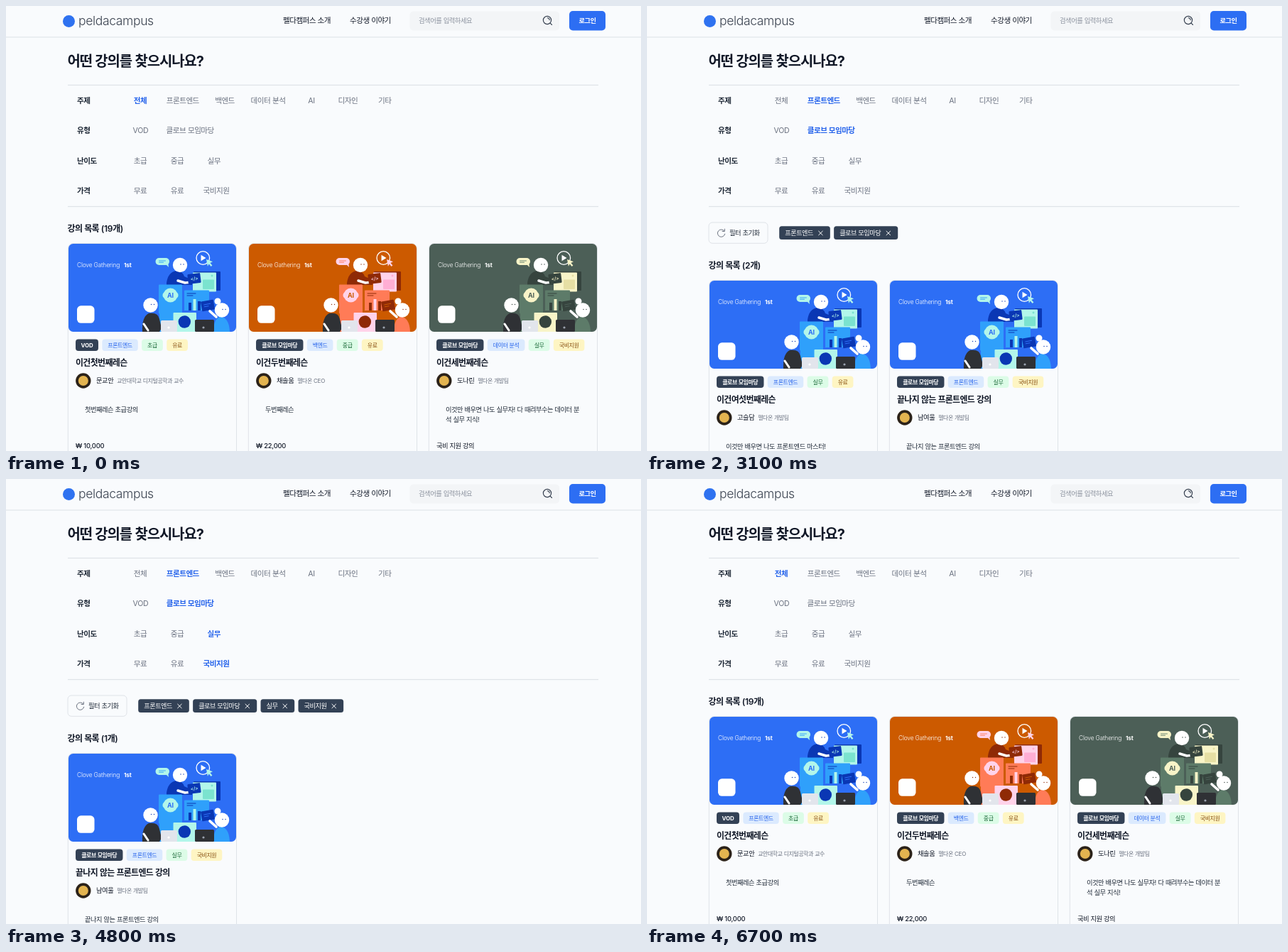
An HTML page for the animation above (8200 ms loop, 894 px wide and 627 px high).

```html
<!DOCTYPE html>
<html lang="ko">
<head>
<meta charset="utf-8">
<title>강의 목록</title>
<style>
html, body { margin: 0; width: 100%; height: 100%; overflow: hidden; background: #f9fbfd; }
svg { display: block; width: 894px; height: 627px; }
text { font-family: Inter, "Noto Sans CJK KR", sans-serif; letter-spacing: -.02em; white-space: pre; }
.ko { letter-spacing: -.052em; }
</style>
</head>
<body>
<svg id="stage" viewBox="0 0 894 627">
  <defs>
    <linearGradient id="shade" x1="0" y1="0" x2=".95" y2=".2">
      <stop offset="0" stop-color="#e5e7eb"/><stop offset="1" stop-color="#f4f5f6"/>
    </linearGradient>
    <clipPath id="cover"><rect width="236" height="124" rx="6.5"/></clipPath>
  </defs>
  <g id="page"></g>
</svg>
<script>
const LOOP = 8200;
const BLUE = '#2563eb', INK = '#111827', GRAY = '#6b7280', LINE = '#dfe3e8', SLATE = '#334155', BONE = '#d1d5db';
const CLUB = '클로브 모임마당';

// Hangul runs are set tighter than Latin
const runs = s => s.replace(/&/g, '&amp;').replace(/</g, '&lt;').replace(/[가-힣]+/g, '<tspan class="ko">$&</tspan>');
const text = (x, mid, s, size, fill = INK, weight = 400, anchor = 'start') =>
  `<text x="${x}" y="${mid + size * .37}" font-size="${size}" fill="${fill}" font-weight="${weight}" text-anchor="${anchor}">${runs(s)}</text>`;
const rect = (x, y, w, h, r, fill, extra = '') =>
  `<rect x="${x}" y="${y}" width="${w}" height="${h}" rx="${r}" fill="${fill}" ${extra}/>`;
const circle = (x, y, r, fill, extra = '') => `<circle cx="${x}" cy="${y}" r="${r}" fill="${fill}" ${extra}/>`;
const path = (d, fill, extra = '') => `<path d="${d}" fill="${fill}" ${extra}/>`;
const stroke = (d, color, w) => path(d, 'none', `stroke="${color}" stroke-width="${w}" stroke-linecap="round" stroke-linejoin="round"`);
const at = (x, y, body, turn = 0) => `<g transform="translate(${x} ${y}) rotate(${turn})">${body}</g>`;

// approximate advance, used for pill sizes
const textWidth = (s, size) =>
  size * [...s].reduce((sum, c) => sum + (c === ' ' ? .27 : c > '\u3000' ? .868 : .67), 0);

const themes = {
  blue: { bg: '#2d6ef5', dark: '#0a37b4', mid: '#2fa0fb', light: '#b2f6ea', tint: '#7be3cf' },
  orange: { bg: '#cc5a00', dark: '#8f2a06', mid: '#ff7b57', light: '#ffd3ea', tint: '#ffaed4' },
  green: { bg: '#4c5f57', dark: '#36443e', mid: '#5d7b69', light: '#f8f4c8', tint: '#e6dfa4' }
};

const course = (tags, title, who, team, lines, price, theme = 'blue') =>
  ({ tags, title, who, team, lines, price, theme });
const first = course(['VOD', '프론트엔드', '초급', '유료'], '이건첫번째레슨', '문교안',
  '교안대학교 디지털공학과 교수', ['첫번째레슨 초급강의'], '₩ 10,000');
const second = course([CLUB, '백엔드', '중급', '유료'], '이건두번째레슨', '채솔움',
  '펠다온 CEO', ['두번째레슨'], '₩ 22,000', 'orange');
const third = course([CLUB, '데이터 분석', '실무', '국비지원'], '이건세번째레슨', '도나린',
  '펠다온 개발팀', ['이것만 배우면 나도 실무자! 다 때려부수는 데이터 분', '석 실무 지식!'], '국비 지원 강의', 'green');
const sixth = course([CLUB, '프론트엔드', '실무', '유료'], '이건여섯번째레슨', '고슬담',
  '펠다온 개발팀', ['이것만 배우면 나도 프론트엔드 마스터!'], '₩ 22,000');
const basics = course(['VOD', '프론트엔드', '실무', '무료'], '프론트엔드 필수 강의', '고슬',
  '펠다온', ['프론트엔드 필수 강의'], '무료');
const endless = course([CLUB, '프론트엔드', '실무', '국비지원'], '끝나지 않는 프론트엔드 강의', '남여울',
  '펠다온 개발팀', ['끝나지 않는 프론트엔드 강의'], '국비 지원 강의');

const filters = [
  ['주제', ['전체', 189], ['프론트엔드', 248.8], ['백엔드', 308], ['데이터 분석', 369], ['AI', 430], ['디자인', 481.3], ['기타', 533.3]],
  ['유형', ['VOD', 189.5], [CLUB, 259.2]],
  ['난이도', ['초급', 189], ['중급', 241], ['실무', 292.7]],
  ['가격', ['무료', 189], ['유료', 241], ['국비지원', 296]]
];

// each step changes part of the state from its time on
const steps = [
  [0, { on: [], hover: '', glow: BLUE, cards: [first, second, third], count: 19, loading: false, scroll: 0 }],
  [700, { hover: '프론트엔드', glow: '#4864ba' }],
  [800, { glow: BLUE }],
  [1400, { on: ['프론트엔드'], hover: '', loading: true }],
  [1600, { cards: [first, sixth, basics], count: 5, loading: false }],
  [2300, { hover: 'VOD' }],
  [2400, { hover: CLUB }],
  [2900, { on: ['프론트엔드', CLUB], hover: '', loading: true }],
  [3100, { cards: [sixth, endless], count: 2, loading: false }],
  [3400, { hover: '실무' }],
  [3700, { on: ['프론트엔드', CLUB, '실무'], hover: '', loading: true }],
  [3900, { loading: false }],
  [4200, { hover: '국비지원' }],
  [4600, { on: ['프론트엔드', CLUB, '실무', '국비지원'], hover: '', loading: true }],
  [4800, { cards: [endless], count: 1, loading: false }],
  [5300, { scroll: 30 }],
  [5400, { scroll: 50 }],
  [5700, { scroll: 18 }],
  [5800, { scroll: 0 }],
  [6200, { on: [], loading: true }],
  [6400, { cards: [first, second, third], count: 19, loading: false }]
];

function header() {
  return circle(88.5, 21.5, 8.5, '#2f72f0') + text(102, 20.5, 'peldacampus', 17.5, '#3b4350', 300)
    + text(390, 20, '펠다캠퍼스 소개', 10.6, INK, 500) + text(484, 20, '수강생 이야기', 10.6, INK, 500)
    + rect(568.5, 7.5, 210.5, 27, 5, '#f3f5f7') + text(581, 20.5, '검색어를 입력하세요', 9.3, '#8b929e')
    + circle(762, 20, 5.6, 'none', 'stroke="#374151" stroke-width="1.2"')
    + stroke('M766.2 24.2l2.3 2.3M762.2 16.8a3.2 3.2 0 0 1 3 3', '#374151', 1.1)
    + rect(793, 7, 51, 27.5, 5, '#2d6ef3') + text(818.5, 20.7, '로그인', 9.3, '#fff', 600, 'middle')
    + rect(0, 43.3, 894, 1.2, 0, '#e1e5ea');
}

function filterPanel(s) {
  let out = text(86.5, 78, '어떤 강의를 찾으시나요?', 19.9, INK, 700)
    + rect(87, 110.8, 747, 1.3, 0, LINE) + rect(87, 281.9, 747, 1.3, 0, LINE);
  filters.forEach(([label, ...options], row) => {
    const y = 133 + row * 42.4;
    out += text(100, y, label, 10.6, '#1f2937', 600);
    for (const [name, x] of options) {
      const picked = s.on.includes(name) || (name === '전체' && !s.on.length);
      const color = picked ? BLUE : s.hover === name ? s.glow : GRAY;
      out += text(x, y, name, 10.6, color, picked ? 700 : 400, 'middle');
    }
  });
  return out;
}

function chips(names) {
  let out = rect(87, 305, 83, 29.3, 5, 'none', `stroke="${LINE}"`)
    + stroke('M108.6 316.8a5.2 5.2 0 1 0 1.1 4.4M109.3 314.2v3.3h-3.3', GRAY, 1)
    + text(116, 320, '필터 초기화', 9.3, '#1f2937', 500);
  let x = 186.2;
  for (const name of names) {
    const w = textWidth(name, 9.2) + 31.7;
    out += rect(x, 310.3, w, 18.8, 3.5, SLATE) + text(x + 8, 320, name, 9.2, '#fff', 500)
      + at(x + w - 13.4, 320, stroke('M-2.8 -2.8L2.8 2.8M2.8 -2.8L-2.8 2.8', '#fff', 1));
    x += w + 5.3;
  }
  return out;
}

function cover({ bg, dark, mid, light, tint }) {
  const white = '#fff', coal = '#2f3135';
  const face = (x, y) => circle(x, y, 10.2, white) + circle(x + 1, y - 1, .7, dark) + circle(x + 5, y - 1, .7, dark);
  const art = rect(0, 0, 236, 124, 0, bg)
    + text(12, 29.5, 'Clove Gathering', 8.4, white, 300) + text(78, 29.5, '1st', 8.2, white, 700)
    + rect(12, 87.3, 24.5, 24.5, 5.5, white)
    // bubble, play button, pointer
    + rect(122.5, 20, 19.5, 10, 5, light) + path('M136 28l5 5l-1 -7z', light) + stroke('M127.5 24h9M127.5 26.2h6', mid, .9)
    + circle(189.3, 20, 9.3, 'none', `stroke="${white}" stroke-width="1.3"`) + path('M186.5 15.7v8.6l7 -4.3z', white)
    + path('M194 22l9 3.2l-3.6 1.8l3 3.4l-1.8 1.5l-2.9 -3.4l-1.8 3.2z', light)
    // boxes
    + rect(176, 39, 38, 27, 1, dark) + rect(175, 40.5, 33, 27, 1, light) + rect(189, 50.5, 16, 13.5, 1, tint)
    + circle(202, 45, 1.5, tint)
    + path('M138 55q2 -15 14 -17q9 1 11 8l11 5v7h-36z', dark) + face(157, 30)
    + stroke('M154 52l10 3l10 -1', white, 3.4)
    + at(177, 49, rect(-9, -7, 18, 14, 1.5, dark) + text(0, 0, '</>', 6.5, light, 600, 'middle'), -7)
    + rect(127, 57.5, 33, 41, 1, mid) + circle(143.5, 72.5, 10, light)
    + circle(136.5, 72.5, 4, light) + circle(150.5, 72.5, 4, light)
    + text(143.5, 72.7, 'AI', 9, bg, 700, 'middle')
    + rect(163, 65.5, 35, 37, 1, mid) + stroke('M167 70h12M167 73h8', dark, 1)
    + rect(169, 83, 4, 11, 0, dark) + rect(175.5, 78, 4, 16, 0, light) + rect(182, 81, 4, 13, 0, dark)
    + rect(163, 94, 42, 30, 1, bg) + rect(128, 97, 22, 27, 1, mid)
    + rect(147.5, 97, 32.5, 27, 1, light) + circle(163.3, 110, 8.7, dark)
    // seated people
    + path('M104 124q-1 -21 9 -26q13 -2 15 8l3 13l-3 5z', coal) + face(115.5, 86.5) + stroke('M106 113l6 9', white, 3)
    + rect(130, 108, 23, 16, 1.5, '#e2e5ec') + circle(141, 118, 1.6, white)
    + path('M204 124q0 -17 9 -21q13 0 14 21z', mid)
    + circle(210, 81, 4.5, white) + face(216, 93.5)
    + at(196, 87, rect(-9, -7, 18, 14, 1, dark) + stroke('M-5 -2h9M-5 1h6', bg, 1), -10)
    + stroke('M208 103l-9 -8', white, 3.6)
    + rect(178, 107, 27, 17, 1.5, coal) + circle(190, 118, 1.6, '#9ca3af');
  return `<g clip-path="url(#cover)">${art}</g>`;
}

const frame = rect(.3, .5, 237.2, 400, 7.5, 'none', `stroke="${LINE}"`);

function card(c) {
  const fills = [[SLATE, '#fff', 700], ['#dbeafe', BLUE, 500], ['#dcfce7', '#166534', 500], ['#fef5c3', '#854d0e', 500]];
  let x = 11;
  const tags = c.tags.map((name, i) => {
    const w = textWidth(name, 7.95) + 16, [bg, fg, weight] = fills[i];
    const tag = rect(x, 135.6, w, 16.3, 4, bg) + text(x + w / 2, 143.8, name, 7.95, fg, weight, 'middle');
    x += w + 5.3;
    return tag;
  }).join('');
  return frame + at(1, 1, cover(themes[c.theme])) + tags
    + text(11, 168.6, c.title, 11.95, INK, 600)
    + circle(21.8, 194, 10.7, '#2b2219') + circle(21.8, 194, 7, '#e3b450')
    + text(40, 194, c.who, 9.3, INK, 500)
    + text(45 + textWidth(c.who, 9.3), 194, c.team, 7.95, GRAY)
    + c.lines.map((line, i) => text(24, 235 + i * 13.6, line, 9.25, '#1f2937')).join('')
    + text(11, 286, c.price, 9.3, INK, 500);
}

function skeleton() {
  const bars = [[208, 10.5, 19, 19], [11, 138, 32, 16], [48, 138, 43, 16], [96, 138, 27, 16], [128, 138, 32, 16],
    [11, 162, 216, 19], [40, 190, 64, 13], [109.5, 191, 53, 11], [11, 215, 216, 13], [11, 231, 180, 13]];
  return frame + path('M0 127.7V7q0 -7 7 -7h224q7 0 7 7v120.7z', 'url(#shade)')
    + bars.map(([x, y, w, h]) => rect(x, y, w, h, h === 16 ? 5 : 3, BONE)).join('')
    + circle(21.7, 196.5, 10.6, BONE);
}

function render(s) {
  const shift = s.on.length ? 52 : 0;
  const list = s.cards.map((c, i) =>
    at(87 + i * 254, 334 + shift, s.loading ? skeleton() : card(c))).join('');
  return header() + filterPanel(s) + (shift ? chips(s.on) : '')
    + text(86.5, 313.8 + shift, `강의 목록 (${s.count}개)`, 12, INK, 600) + list;
}

const page = document.getElementById('page');
let shown = -1;

function draw(t) {
  const passed = steps.filter(([start]) => start <= t);
  if (passed.length === shown) return;
  shown = passed.length;
  const state = Object.assign({}, ...passed.map(([, change]) => change));
  page.innerHTML = render(state);
  page.setAttribute('transform', `translate(0 ${-state.scroll})`);
}

const begin = performance.now();
function tick() {
  draw((performance.now() - begin) % LOOP);
  requestAnimationFrame(tick);
}
tick();
</script>
</body>
</html>
```
